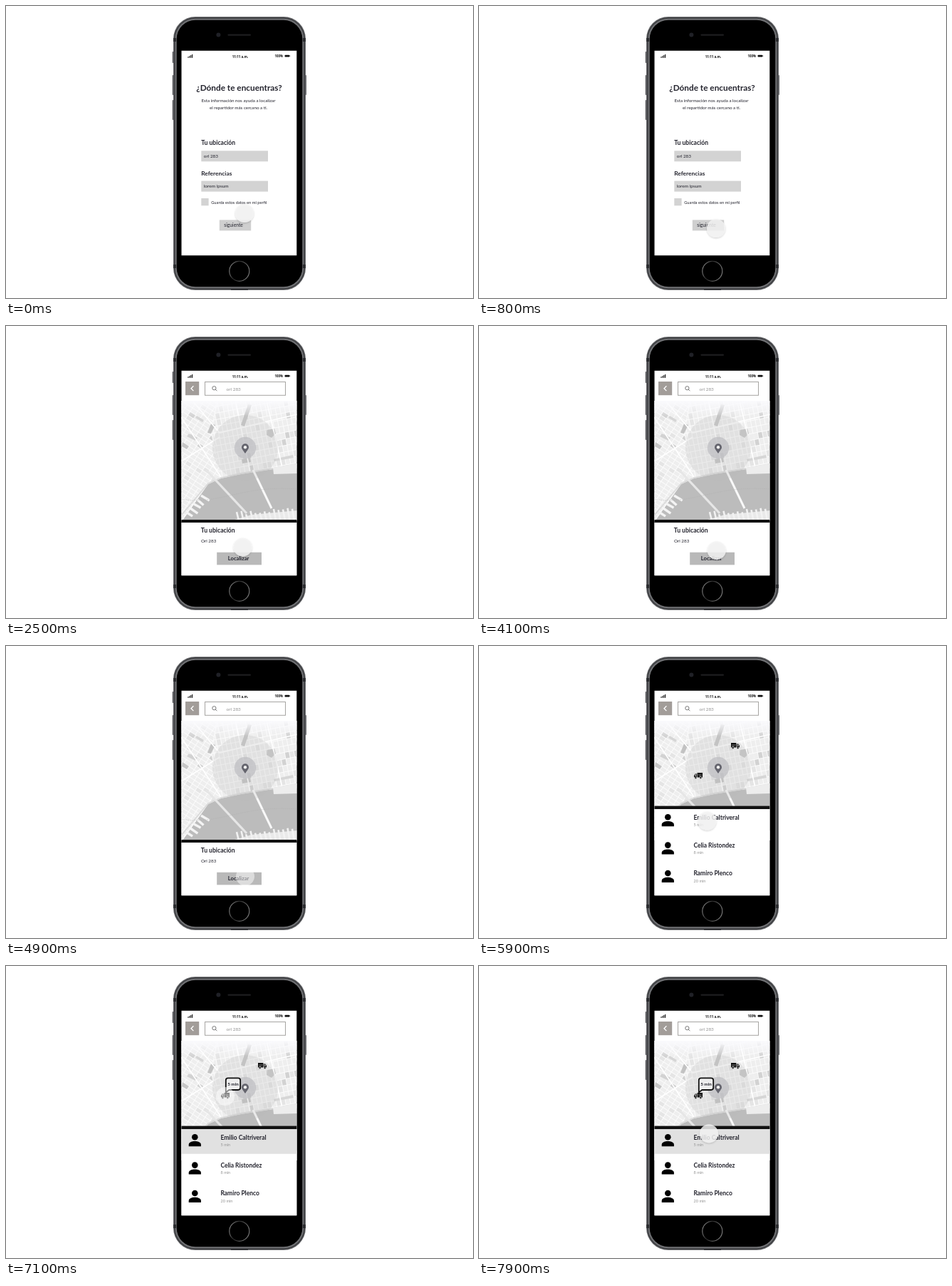
An HTML page for the animation above (8000 ms loop, 656 px wide and 410 px high).

```html
<!DOCTYPE html>
<html lang="es">
<head>
<meta charset="utf-8">
<title>Localizar repartidor</title>
<style>
  html, body { margin: 0; width: 100%; height: 100%; overflow: hidden; background: #fff; }
  svg { display: block; width: 656px; height: 410px; }
  text { font-family: Lato, "Open Sans", sans-serif; fill: #23232d; }
  .b { font-weight: 700; }
  .mid { text-anchor: middle; }
  .status { font-family: "Open Sans", sans-serif; font-weight: 700; fill: #111; }
  .soft { fill: #929292; }
</style>
</head>
<body>
<svg viewBox="0 0 656 410" xmlns="http://www.w3.org/2000/svg">
  <defs>
    <linearGradient id="ring" x2="1" y2=".35">
      <stop offset="0" stop-color="#9a9a9a"/><stop offset=".45" stop-color="#2b2b2b"/>
      <stop offset="1" stop-color="#777"/>
    </linearGradient>
    <linearGradient id="fade" x2="0" y2="1">
      <stop offset="0" stop-color="#fafafd"/><stop offset="1" stop-color="#fafafd" stop-opacity="0"/>
    </linearGradient>
    <filter id="shadow" x="-40%" y="-40%" width="180%" height="180%">
      <feDropShadow dx="0" dy="1.2" stdDeviation="1.1" flood-color="#000" flood-opacity=".22"/>
    </filter>
    <clipPath id="screen"><rect x="246.5" y="62.7" width="161.8" height="287.6"/></clipPath>
    <clipPath id="mapArea"><rect x="246" y="105" width="163" height="168"/></clipPath>
    <clipPath id="west"><path d="M246 105H296L288 150 302 212 284 221 246 273Z"/></clipPath>
    <clipPath id="east"><path d="M297 105H409V200L302 215 289 150Z"/></clipPath>
    <g id="truck">
      <path d="M-6-4H1.4V2.6H-6ZM2-2.4H4.3L6 .1V2.6H2Z" fill="#111"/>
      <path d="M2.8-1.6H4L5 .1H2.8Z" fill="#eee"/>
      <path d="M-4.8-1.2H.2M-4.8.4H-1" stroke="#999" stroke-width=".6"/>
      <g fill="#111" stroke="#eee" stroke-width=".6">
        <circle cx="-3.3" cy="2.9" r="1.5"/><circle cx="3.6" cy="2.9" r="1.5"/>
      </g>
    </g>
    <g id="person">
      <circle cy="-4" r="4.3"/>
      <path d="M-8.6 9V6.6C-8.6 3.2-3.4 1.8 0 1.8S8.6 3.2 8.6 6.6V9Z"/>
    </g>
  </defs>
  <g id="phone"></g>
  <g clip-path="url(#screen)">
    <rect x="246" y="62" width="163" height="289" fill="#fff"/>
    <g id="form"></g>
    <g id="locate">
      <g id="map" clip-path="url(#mapArea)"></g>
      <g id="header"></g>
      <g id="confirm"></g>
      <g id="drivers"></g>
    </g>
    <g id="status"></g>
    <g id="cursor">
      <circle id="disc" r="13"/>
    </g>
  </g>
</svg>
<script>
const $ = id => document.getElementById(id);
const rect = (x, y, w, h, fill, more = '') =>
  `<rect x="${x}" y="${y}" width="${w}" height="${h}" fill="${fill}" ${more}/>`;
const path = (d, fill, more = '') => `<path d="${d}" fill="${fill}" ${more}/>`;
const line = (d, color, width, more = '') =>
  `<path d="${d}" fill="none" stroke="${color}" stroke-width="${width}" ${more}/>`;
const text = (x, y, size, str, cls = '') =>
  `<text x="${x}" y="${y}" font-size="${size}" class="${cls}">${str}</text>`;

function random(seed) {
  return () => (seed = (seed * 16807) % 2147483647) / 2147483647;
}

// Rows of city blocks on a rotated grid
function blocks(clip, angle, cx, cy, w, h, seed) {
  const rnd = random(seed);
  let out = '';
  for (let y = -110; y < 110; y += h) {
    for (let x = -100; x < 100; x += w) {
      const r = rnd();
      const fill = r > .985 ? '#d2d2d2' : r > .9 ? '#e5e5e5' : '#eeeeee';
      const wide = rnd() > .85 ? w : w - 1;
      out += rect(x.toFixed(1), y.toFixed(1), wide, h - 1, fill);
    }
  }
  return `<g clip-path="url(#${clip})"><g transform="translate(${cx} ${cy}) rotate(${angle})">${out}</g></g>`;
}

function drawPhone() {
  const shell = (inset, fill) =>
    rect(235 + inset, 15 + inset, 186 - 2 * inset, 384 - 2 * inset, fill, `rx="${31 - inset}"`);
  let s = '';
  for (const [y, h] of [[64, 16], [97, 28], [132, 28]]) s += rect(233.8, y, 2, h, '#505155', 'rx=".8"');
  s += rect(420, 97, 1.9, 28, '#505155', 'rx=".8"');
  s += shell(0, '#6c6d70') + shell(.9, '#3f4043') + shell(2.7, '#707174') + shell(4.7, '#000');
  for (const y of [45, 363]) s += rect(235, y, 4, 5, '#2c2d30') + rect(417, y, 4, 5, '#2c2d30');
  s += rect(316, 397.4, 24, 1.6, '#2c2d30');
  s += '<circle cx="298.4" cy="40.6" r="3" fill="#202127"/>';
  s += rect(311.5, 39.4, 32.5, 2.4, '#1d1d1f', 'rx="1.2"');
  s += '<circle cx="327.8" cy="372.3" r="14" fill="#000" stroke="url(#ring)" stroke-width="1.2"/>';
  $('phone').innerHTML = s;
}

function drawStatus() {
  let s = '';
  for (let i = 0; i < 4; i++) s += rect(255.3 + i * 1.9, 71.2 - i * 1.1, 1.2, 1.6 + i * 1.1, '#222');
  s += text(329, 72.6, 4.5, '11:11 a.m.', 'status mid');
  s += text(377.6, 72, 4.4, '100%', 'status');
  s += rect(391.6, 68.7, 6.6, 2.9, '#111', 'rx=".9"') + rect(398.4, 69.5, .8, 1.3, '#111');
  $('status').innerHTML = s;
}

function drawForm() {
  $('form').innerHTML =
    text(327.5, 118.6, 11.8, '¿Dónde te encuentras?', 'b mid') +
    text(326.5, 135, 6.28, 'Esta información nos ayuda a localizar', 'mid') +
    text(326.5, 145, 6.28, 'el repartidor más cercano a ti.', 'mid') +
    text(274.2, 195.4, 8.6, 'Tu ubicación', 'b') +
    rect(274.3, 203.3, 93.7, 15, '#d3d3d3') +
    text(277.8, 213, 6.4, 'orl 283') +
    text(274.2, 238.4, 8.4, 'Referencias', 'b') +
    rect(274.3, 245.6, 93.7, 15, '#d3d3d3') +
    text(277.8, 255.2, 6.5, 'lorem ipsum') +
    rect(274.3, 270, 10.3, 10.3, '#d3d3d3') +
    text(288.2, 277.6, 5.75, 'Guarda estos datos en mi perfil') +
    rect(299.8, 300.4, 44.4, 15, '#cfcfcf') +
    text(319.6, 310, 6.7, 'siguiente', 'mid');
}

function drawMap() {
  const rnd = random(23);
  let s = rect(246, 105, 163, 168, '#fbfbfb');
  s += blocks('west', 33, 265, 170, 8.5, 6, 41);
  s += blocks('east', -11, 350, 160, 6.5, 9, 97);
  // Parks and squares
  s += path('M340 110 345 111 335 141 330 139Z', '#c6c6c6');
  s += path('M288 137 294 139 288 151 283 150Z', '#c2c2c2');
  s += path('M367 146 377 144 379 151 373 157 366 153Z', '#c8c8c8');
  s += path('M257 151 269 157 266 161 254 155Z', '#d2d2d2');
  s += path('M248 163 257 169 254 173 247 169Z', '#c6c6c6');
  s += path('M268 126 278 132 276 135 266 129Z', '#d6d6d6');
  s += path('M331 187 343 185 344 191 332 193Z', '#c2c2c2');
  s += path('M376 187 403 181 404 185 377 190Z', '#d6d6d6');
  // Avenues
  s += line('M246 128 302 212M262 105 300 150 409 124M246 190 300 156M322 105 343 204M366 105 388 198', '#fff', 1.6);
  // River and shore
  s += path('M284 222 302 214 330 208 375 201 409 195V273H248Z', '#bcbcbc');
  s += line('M246 266 284 221 302 213 330 207 375 200 409 194', '#dadada', 1.8);
  s += path('M375 199 409 193V207L376 208Z', '#ededed');
  // Piers on both banks
  for (let i = 0; i < 5; i++) {
    s += line(`M${254 + i * 5} ${262 - i * 6}l${8 + rnd() * 6} ${5 + rnd() * 4}`, '#f4f4f4', 3.4);
  }
  s += path('M318 273 345 265 409 259V273Z', '#e9e9e9');
  for (let i = 0; i < 13; i++) {
    s += line(`M${327 + i * 6.5} 273l-3-${(7 + i * .5 + rnd() * 6).toFixed(1)}`, '#f2f2f2', 2.6);
  }
  // Bridges
  s += line('M281 202 338 263', '#e6e6e6', 3.2) + line('M347 202 373 256', '#f8f8f8', 3);
  s += line('M246 243C300 252 330 223 409 229', '#adadad', .4, 'stroke-dasharray="2 1"');
  s += rect(246, 105, 163, 22, 'url(#fade)');
  s += '<circle cx="336" cy="171" r="46" fill="#b8b8b8" opacity=".24"/>';
  s += '<circle cx="336" cy="171" r="15.2" fill="#bebec3" opacity=".72"/>';
  s += path('M336 179C333.5 175 331 172.8 331 170.2A5 5 0 0 1 341 170.2C341 172.8 338.5 175 336 179Z', '#64646d');
  s += '<circle cx="336" cy="170.2" r="2.2" fill="#eee"/>';
  $('map').innerHTML = s;
}

function drawHeader() {
  $('header').innerHTML =
    rect(252, 78, 19.2, 19.2, '#a29d99') +
    line('M263.4 84.3 260 87.7 263.4 91.1', '#fff', 1.3) +
    rect(279.5, 78.5, 113, 18.8, '#fff', 'stroke="#a6a4a2"') +
    '<circle cx="292.4" cy="87.2" r="2.6" fill="none" stroke="#555" stroke-width=".8"/>' +
    line('M294.3 89.1 296.4 91.2', '#555', .8) +
    text(309.6, 90.5, 6.4, 'orl 283', 'soft');
}

function drawConfirm() {
  $('confirm').innerHTML =
    rect(246, 272, 163, 4.2, '#111') +
    rect(246, 276.2, 163, 75, '#fff') +
    text(273.8, 289.8, 8.6, 'Tu ubicación', 'b') +
    text(274, 303.7, 6.3, 'Orl 283') +
    rect(296.2, 317.8, 62.8, 17.6, '#b9b9b9') +
    text(326.6, 328.6, 7.6, 'Localizar', 'b mid');
}

function drawDrivers() {
  const list = [['Emilio Caltriveral', 5], ['Celia Ristondez', 8], ['Ramiro Plenco', 20]];
  let s = '<use href="#truck" x="360" y="140"/>' +
    '<use href="#truck" transform="translate(308 182) scale(-1 1)"/>';
  s += '<g id="bubble">' +
    path('M312 157.3H326A3.2 3.2 0 0 1 329.2 160.5V170.8A3.2 3.2 0 0 1 326 174H313.2L308.8 177.6V160.5A3.2 3.2 0 0 1 312 157.3Z',
      '#eeeeee', 'stroke="#111" stroke-width="1.8" stroke-linejoin="round"') +
    text(319, 168.2, 6.3, '5 min', 'b mid') + '</g>';
  s += rect(246, 224.6, 163, 4.4, '#111') + rect(246, 229, 163, 122, '#fff');
  s += rect(246, 229, 163, 34.8, '#e1e1e1', 'id="chosen"');
  list.forEach(([name, min], i) => {
    const y = 244.2 + i * 39.4;
    s += `<use href="#person" x="265.3" y="${y}"/>`;
    s += text(301.4, y - .6, 8.5, name, 'b') + text(301.6, y + 8.6, 5.5, min + ' min', 'soft');
  });
  $('drivers').innerHTML = s;
}

const LOOP = 8000, STEP = 100;
// start, end, then from and to points
const moves = [
  [400, 800, 335, 291, 333, 312],
  [2400, 2500, 333, 312, 332.5, 310.5],
  [4000, 4500, 332.5, 310.5, 336, 323.5],
  [5600, 6500, 336, 323.5, 308, 183],
  [7600, 8500, 308, 183, 335, 277]
];
const presses = [[2200, 2500], [4900, 5100], [6900, 7700]];
const easeOut = p => 1 - (1 - p) ** 2;

function cursorAt(t) {
  const [a, b, x0, y0, x1, y1] = moves.filter(m => t >= m[0]).pop() || moves[0];
  const k = easeOut(Math.min(1, Math.max(0, (t - a) / (b - a))));
  return [x0 + (x1 - x0) * k, y0 + (y1 - y0) * k];
}

function show(id, on) {
  $(id).style.display = on ? '' : 'none';
}

function render(ms) {
  const t = Math.floor((ms % LOOP) / STEP) * STEP;
  show('form', t < 2500);
  show('locate', t >= 2500);
  show('confirm', t < 5100);
  show('drivers', t >= 5100);
  show('bubble', t >= 7100);
  show('chosen', t >= 7100);

  const pressed = presses.some(([a, b]) => t >= a && t < b);
  const [x, y] = cursorAt(t);
  $('cursor').setAttribute('transform', `translate(${x.toFixed(2)} ${y.toFixed(2)})`);
  const disc = $('disc');
  disc.setAttribute('fill', pressed ? '#fff' : '#f4f4f4');
  disc.setAttribute('fill-opacity', pressed ? .5 : .82);
  if (pressed) disc.removeAttribute('filter');
  else disc.setAttribute('filter', 'url(#shadow)');
}

drawPhone();
drawStatus();
drawForm();
drawMap();
drawHeader();
drawConfirm();
drawDrivers();

const begin = performance.now();
function tick() {
  render(performance.now() - begin);
  requestAnimationFrame(tick);
}
tick();
</script>
</body>
</html>
```
